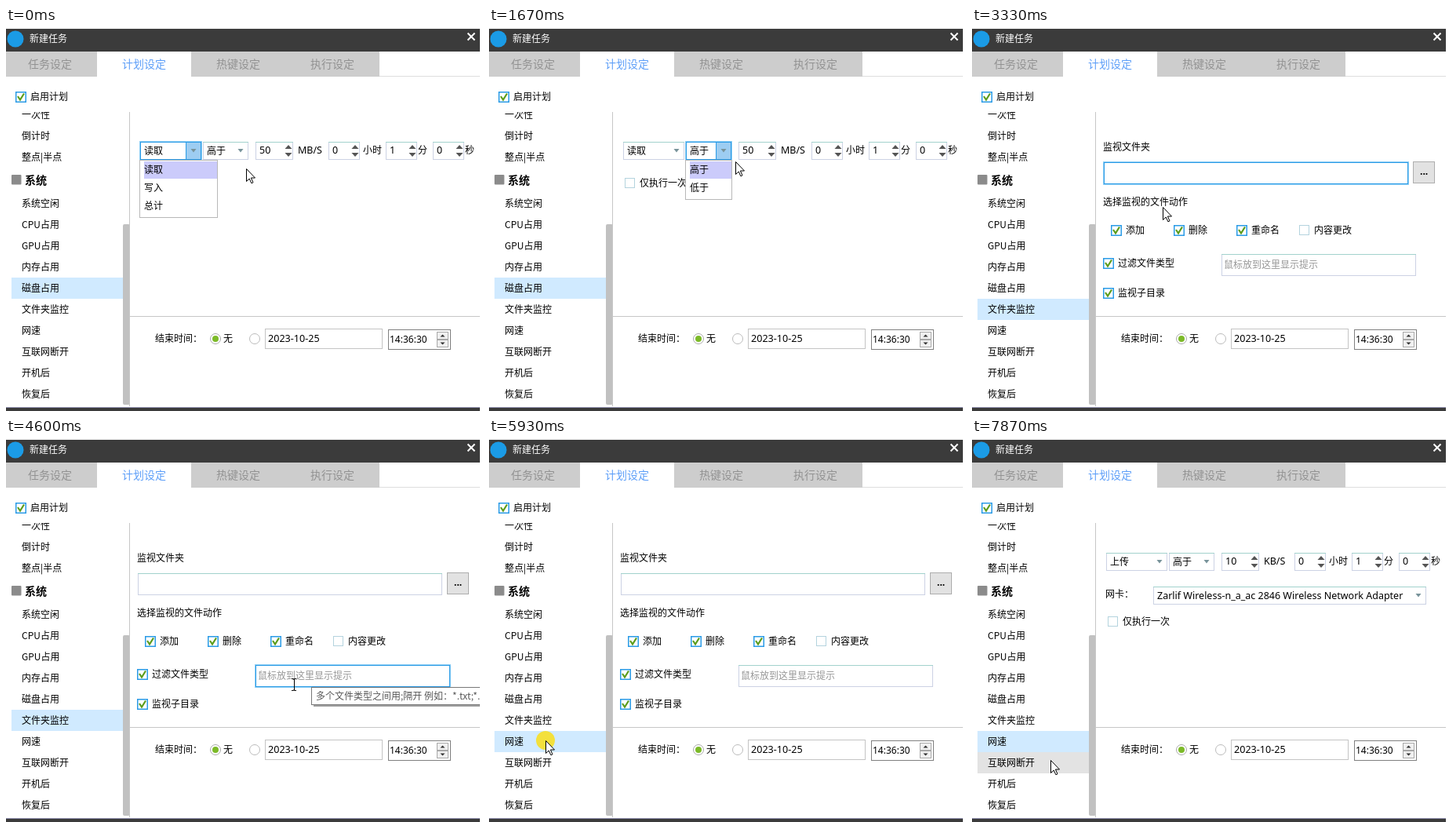
An HTML page for the animation above (8000 ms loop, 608x488 px).

```html
<!DOCTYPE html>
<html lang="zh-CN">
<head>
<meta charset="utf-8">
<title>新建任务</title>
<style>
html, body { margin: 0; width: 100%; height: 100%; overflow: hidden; background: #fff; }
svg { display: block; }
text { font-family: 'Noto Sans CJK SC', 'Noto Sans CJK', 'Noto Sans', sans-serif; white-space: pre; }
.latin { font-family: 'Noto Sans', sans-serif; }
</style>
</head>
<body>
<svg id="stage" width="608" height="488" viewBox="0 0 608 488"></svg>
<script>
const LOOP = 8000, STEP = 200 / 3;
const stage = document.getElementById('stage');
const BLUE = '#2a9be6', GLOW = '#8fcff5';

// Basic shapes; text is placed by its vertical centre.
const rect = (x, y, w, h, fill, extra = '') =>
  `<rect x="${x}" y="${y}" width="${w}" height="${h}" fill="${fill}" ${extra}/>`;
const frame = (x, y, w, h, stroke, fill = '#fff', sw = 1) =>
  rect(x + sw / 2, y + sw / 2, w - sw, h - sw, fill, `stroke="${stroke}" stroke-width="${sw}"`);
const path = (d, stroke, sw = 1, fill = 'none') =>
  `<path d="${d}" stroke="${stroke}" stroke-width="${sw}" fill="${fill}"/>`;
const circle = (x, y, r, fill, stroke = 'none') =>
  `<circle cx="${x}" cy="${y}" r="${r}" fill="${fill}" stroke="${stroke}"/>`;
const tri = (x, y, w, h, fill) => path(`M${x - w} ${y}H${x + w}L${x} ${y + h}Z`, 'none', 0, fill);
function text(x, cy, s, size = 12, fill = '#000', weight = 400) {
  const kind = /^[\x20-\x7e]+$/.test(s) ? 'class="latin"' : '';
  return `<text ${kind} x="${x}" y="${Math.round(cy + size * 0.34)}" font-size="${size}" fill="${fill}" font-weight="${weight}">${s}</text>`;
}

// Controls
const softBox = (x, y, w, h) =>
  frame(x, y, w, h, '#ccd2e4') + path(`M${x} ${y + .5}h${w}`, '#a2d2cd');
const focusBox = (x, y, w, h) =>
  frame(x - 1, y - 1, w + 2, h + 2, GLOW) + frame(x, y, w, h, BLUE);
const field = (x, y, w, h, focused) => (focused ? focusBox : softBox)(x, y, w, h);

function check(x, y, label, on = true) {
  const box = on
    ? frame(x, y, 14, 14, BLUE, '#fff', 1.5) +
      path(`M${x + 3} ${y + 6}l3 4.5l5 -8`, '#5c9c1c', 2.2)
    : frame(x, y, 13, 13, '#b4d3de');
  return box + text(x + 19, y + 7, label);
}
function combo(x, y, w, label, hot, size = 12) {
  const h = 23, r = x + w;
  let box = field(x, y, w, h, hot);
  if (hot) box += rect(r - 19, y + 1, 18, h - 2, '#9dcdf2') + path(`M${r - 19.5} ${y}v${h}`, BLUE);
  return box + text(x + 5, y + 12, label, size) + tri(r - 10, y + 9, 3.5, 4.5, '#78939a');
}
function spin(x, w, value) {
  const a = x + w - 6;
  return softBox(x, 145, w, 23) + text(x + 5, 156, value, 12.5) +
    tri(a, 154, 4.5, -5, '#555') + tri(a, 159, 4.5, 5, '#555');
}
function list(x, w, items) {
  return frame(x, 168, w, items.length * 23 + 5, '#b8b8b8') +
    rect(x + 6, 170, w - 7, 22, '#cbcbfb') +
    items.map((s, i) => text(x + 6, 181 + 23 * i, s)).join('');
}

// Sidebar
const rows = ['系统空闲', 'CPU占用', 'GPU占用', '内存占用', '磁盘占用',
  '文件夹监控', '网速', '互联网断开', '开机后', '恢复后'];
const rowTop = i => 210 + 27 * i;

function sidebar(sel, hover) {
  let s = '<svg x="0" y="107" width="158" height="375" viewBox="0 107 158 375">';
  ['一次性', '倒计时', '整点|半点'].forEach((label, i) => s += text(20, 111 + 27 * i, label));
  s += rect(7, 187, 12.5, 12.5, '#8b8b8b', 'rx="1"') + text(24, 194, '系统', 14, '#000', 700);
  rows.forEach((label, i) => {
    if (i === sel) s += rect(7, rowTop(i), 142, 27, '#d0eaff');
    else if (i === hover) s += rect(7, rowTop(i), 142, 27, '#e3e3e3');
    s += text(20, rowTop(i) + 13.5, label);
  });
  return s + rect(149, 250, 9, 230, '#c1c1c1', 'rx="2"') + '</svg>' +
    path('M157.5 107V482', '#c6c6c6');
}

function chrome() {
  let s = rect(0, 1, 604, 29, '#3b3b3b') + circle(12, 14, 10.5, '#1b9be6') +
    text(30, 14, '新建任务', 12, '#fff') +
    path('M588.5 6.5l9 9m0 -9l-9 9', '#fff', 2) +
    path('M0 61.5H604', '#dedede') +
    rect(0, 30, 116, 32, '#cdcdcd') + rect(236, 30, 240, 32, '#cdcdcd') + rect(116, 30, 120, 32, '#fff');
  ['任务设定', '计划设定', '热键设定', '执行设定'].forEach((label, i) =>
    s += text(28 + 120 * i, 46, label, 14, i === 1 ? '#5e9ff8' : '#929292'));
  s += check(12, 81, '启用计划');
  s += path('M158 367.5H604', '#c6c6c6') + text(190, 396, '结束时间：');
  s += circle(267, 396, 6.5, '#fff', '#aaa') + circle(267, 396, 4, '#7cba28') + text(277, 396, '无');
  s += circle(317, 396, 6.5, '#fff', '#bbb');
  s += frame(330, 383, 150, 26, '#c4c4c4') + text(334, 396, '2023-10-25', 12.6);
  s += frame(487, 384, 80, 26, '#808080') + text(489, 397, '14:36:30');
  for (const [y, d] of [[387, -1], [397, 1]])
    s += frame(549, y, 15, 10, '#a8a8a8', '#f0f0f0') + tri(556.5, y + 5 - 1.5 * d, 3, 3 * d, '#333');
  return s + rect(0, 483, 604, 1, '#8a8aa8') + rect(0, 484, 604, 4, '#3b3b3b');
}

// Pages
function rateRow(kind, amount, unit, hot1, hot2) {
  return combo(171, 145, 78, kind, hot1) + combo(251, 145, 58, '高于', hot2) +
    spin(318, 48, amount) + text(372, 156, unit, 12.5) +
    spin(411, 40, '0') + text(455, 156, '小时') +
    spin(484, 40, '1') + text(525, 156, '分') +
    spin(544, 40, '0') + text(585, 156, '秒');
}
function diskPage(t, over) {
  const open1 = t < 200, open2 = t >= 1130 && t < 1800;
  let s = rateRow('读取', '50', 'MB/S', open1 || over(171, 145, 78, 23), open2 || over(251, 145, 58, 23)) +
    check(173, 191, '仅执行一次', false);
  if (open1) s += list(170, 100, ['读取', '写入', '总计']);
  if (open2) s += list(250, 60, ['高于', '低于']);
  return s;
}
function folderPage(t) {
  let s = text(167, 152, '监视文件夹') + field(168, 171, 388, 28, t >= 2800 && t < 3670);
  s += frame(562, 170, 28, 28, '#adadad', '#e2e2e2') + text(571, 183, '...', 12, '#000', 700);
  s += text(167, 222, '选择监视的文件动作');
  ['添加', '删除', '重命名', '内容更改'].forEach((label, i) => s += check(177 + 80 * i, 251, label, i < 3));
  s += check(167, 293, '过滤文件类型') + check(167, 331, '监视子目录');
  s += field(318, 288, 248, 28, t >= 3670 && t < 4730) + text(321, 302, '鼠标放到这里显示提示', 12, '#969696');
  if (t >= 4400 && t < 4730)
    s += rect(392, 319, 230, 22, '#a0a0a0') + frame(389, 316, 230, 23, '#787878') +
      text(395, 328, '多个文件类型之间用;隔开 例如：*.txt;*.jpg', 12, '#575757');
  return s;
}
function netPage(over) {
  return rateRow('上传', '10', 'KB/S', over(171, 145, 78, 23), over(251, 145, 58, 23)) +
    text(170, 198, '网卡：') +
    combo(231, 188, 348, 'Zarlif Wireless-n_a_ac 2846 Wireless Network Adapter', over(231, 188, 348, 23), 12.5) +
    check(173, 226, '仅执行一次', false);
}

// Pointer path: time, x, y
const keys = [
  [0, 306, 179], [70, 306, 179], [330, 303, 153], [400, 303, 153], [930, 290, 154],
  [1070, 290, 154], [1400, 355, 164], [1670, 314, 170], [1930, 130, 287], [2130, 72, 362],
  [2530, 72, 362], [2870, 235, 186], [3270, 235, 186], [3330, 243, 228], [3870, 370, 305],
  [4330, 370, 305], [4600, 367, 313], [4930, 219, 344], [5000, 219, 344], [5130, 225, 340],
  [5600, 90, 405], [5800, 72, 384], [6070, 72, 384], [6130, 80, 402], [6270, 80, 402],
  [6800, 271, 196], [6930, 271, 196], [7400, 239, 158], [7600, 239, 158], [7870, 100, 409], [8000, 100, 409]
];
function pointerAt(t) {
  const i = Math.max(1, keys.findIndex(k => k[0] >= t));
  const [a, ax, ay] = keys[i - 1], [b, bx, by] = keys[i];
  const u = (t - a) / (b - a), e = u * u * (3 - 2 * u);
  return [Math.round(ax + (bx - ax) * e), Math.round(ay + (by - ay) * e)];
}
function pointer(x, y, beam) {
  const d = beam
    ? path('M-3 -7.5h2.5l.5 1l.5 -1h2.5M.5 -7V7M-3 7.5h2.5l.5 -1l.5 1h2.5', '#000')
    : path('M.5 .5V16.5L4.2 13L6.9 18.8L9 17.8L6.4 12H11.5Z', '#000', 1, '#fff');
  return `<g transform="translate(${x} ${y})">${d}</g>`;
}

function draw(t) {
  const [x, y] = pointerAt(t);
  const over = (l, top, w, h) => x >= l && x < l + w && y >= top && y < top + h;
  const sel = t < 2200 ? 4 : t < 5930 ? 5 : 6;
  const hover = rows.findIndex((_, i) => over(7, rowTop(i), 142, 27));
  const onFolder = t >= 2330 && t < 6070;
  const page = t < 2330 ? diskPage(t, over) : onFolder ? folderPage(t) : netPage(over);
  const clicking = (t >= 2200 && t < 2400) || (t >= 5930 && t < 6130);
  const beam = onFolder && (over(168, 171, 388, 28) || over(318, 288, 248, 28));
  stage.innerHTML = '<svg width="604" height="488">' + chrome() + sidebar(sel, hover) + page +
    (clicking ? circle(x, y, 12, '#f3e03c') : '') + pointer(x, y, beam) + '</svg>';
}

// The picture advances fifteen times a second, on times rounded to 10 ms.
let last = -1;
function tick(now) {
  const n = Math.floor((now % LOOP + 5) / STEP) % (LOOP / STEP);
  if (n !== last) draw(Math.round(n * STEP / 10) * 10);
  last = n;
  requestAnimationFrame(() => tick(performance.now() - start));
}
draw(0);
const start = performance.now();
tick(0);
</script>
</body>
</html>
```
